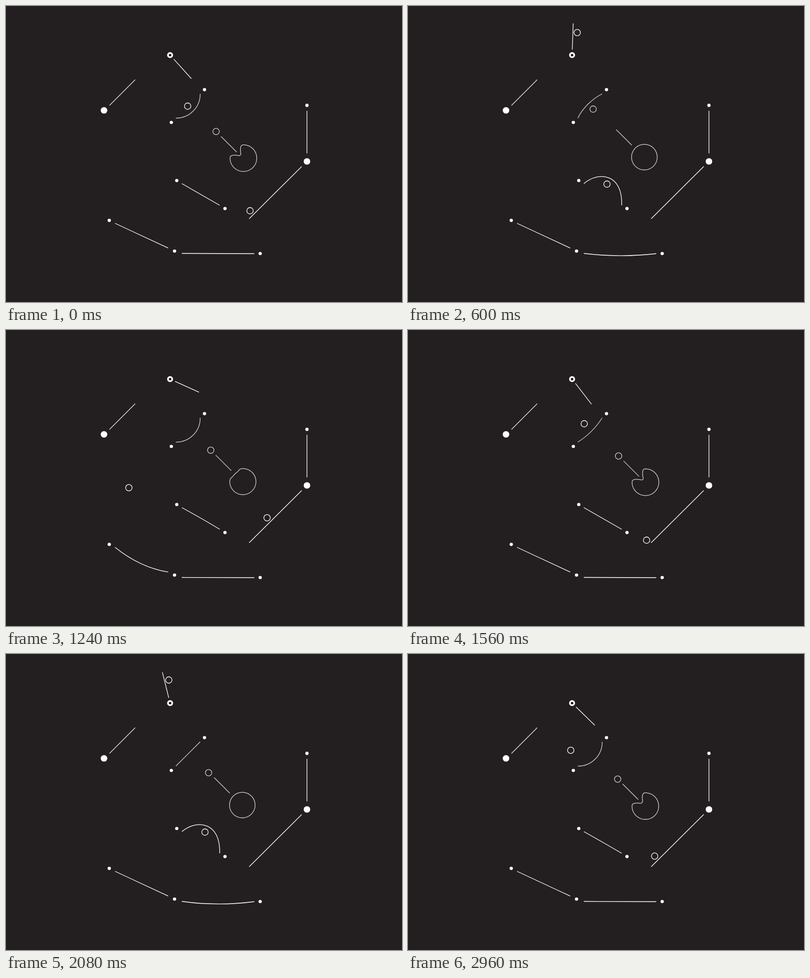
Recreate the animation shown at these times as an HTML page with a canvas. Size 800 by 600 pixels, loop 3 s.

```html
<!DOCTYPE html>
<html lang="en">
<head>
<meta charset="utf-8">
<title>Line machine</title>
<style>
  html, body { margin: 0; width: 100%; height: 100%; overflow: hidden; background: #231f20; }
  canvas { display: block; width: 800px; height: 600px; }
</style>
</head>
<body>
<canvas id="stage" width="800" height="600"></canvas>
<script>
const ctx = document.getElementById('stage').getContext('2d');
const WHITE = '#fff', GREY = '#d3d1d1', BACK = '#231f20';
const BEAT = 1500, STEP = 40;
const PIVOT = [331.5, 99.5];
const CATCH = 1200, FIRE = 560, FREE = 580, PUSH = 16.3;

const mix = (a, b, u) => a + (b - a) * u;
const span = (a, b, t) => Math.max(0, Math.min(1, (t - a) / (b - a)));
const easeOut = (u, n = 3) => 1 - (1 - u) ** n;
const ringing = (s, speed) => Math.exp(-s / 170) * Math.cos(s * speed);

// Bounce points: [time, x, y, pull]; pull 1 falls from rest, -1 slows to rest.
const course = [
  [0, 367, 203, 0], [60, 356, 190, .5], [440, 285, 104, -1], [600, 342, 54, 0],
  [820, 572, 336, .6], [920, 558.3, 345.5, 0], [1160, 538, 370, .95], [1500, 493, 415, 0],
  [1560, 482, 426, 0], [1650, 462, 489, .4], [1735, 443, 527, -1], [1800, 428, 489, 1],
  [1930, 399, 400, 0], [2060, 402, 361, -1], [2120, 402, 361, 0], [2320, 274, 452, .6],
  [2420, 266, 483, -.8], [2500, 264, 486, -1], [2620, 258, 448, 1], [2865, 238, 186, 0],
  [3000, 367, 203, .8]
];
const shuttle = [
  [FIRE, 426.8, 256.8, 0], [FREE, 409.3, 240.6, 0], [600, 374, 209, 0],
  [700, 348.4, 186, -.9], [990, 348, 185.3, 0], [CATCH, 410.5, 240.5, 0]
];

function follow(path, t) {
  const i = Math.max(1, path.findIndex(key => key[0] >= t));
  const [t0, x0, y0] = path[i - 1], [t1, x1, y1, pull] = path[i];
  const u = span(t0, t1, t);
  return [mix(x0, x1, u), mix(y0, y1, u + pull * (u * u - u))];
}

// A band stretches while a ball sinks in, then rings out.
const pluck = (hit, release, speed) => p =>
  p < release ? easeOut(span(hit, release, p)) : ringing(p - release, speed);

// The sling flips over after the first throw and stays cocked for the next ball.
function sling(p) {
  if (p < 20) return 1;
  if (p < FREE) return ringing(p - 20, .031);
  if (p < 990) return -easeOut(span(FREE, 990, p));
  return mix(-1, 1, easeOut(span(990, 1080, p)));
}

// End points, the two control points at full stretch, and the stretch over a beat.
const bands = [
  { color: GREY, a: [392.3, 178], b: [343, 227.3],
    full: [392.6, 205.5, 370.5, 227.6], back: [345, 153, 311, 184], bend: sling },
  { color: WHITE, a: [355.3, 360], b: [431.7, 404],
    full: [386, 334, 434, 340], bend: pluck(430, 620, .0218) },
  { color: WHITE, a: [355.3, 501.5], b: [501.5, 502],
    full: [404, 552.5, 453, 552.5], bend: pluck(150, 235, .0177) },
  { color: WHITE, a: [220.3, 440.5], b: [327.7, 490.7],
    full: [223, 489, 266, 522], bend: pluck(820, 1000, .0239) }
];

const smallDots = [[401, 169.6], [334, 236], [345, 353.8], [442.4, 410.6], [208.6, 434.6],
  [340.5, 496.7], [513.5, 501.7], [608, 201.4]];

// Steady drift, plus a swing that speeds up to the throw and dies away after it.
function paddleAngle(p) {
  const t = p < 60 ? p + BEAT : p;
  const swing = t < 600
    ? 171 * ((t - 60) / 540) ** 2.3 - 171
    : 55 * (1 - Math.exp((600 - t) / 75));
  return (272 + .09 * (t - 600) + swing) * Math.PI / 180;
}

function plungerPush(p) {
  if (p >= FIRE && p < CATCH) return PUSH * (1 - span(FIRE, FREE, p));
  const t = p < FIRE ? p + BEAT : p;
  return PUSH * easeOut(span(CATCH, FIRE + BEAT, t), 4.5);
}

function stroke(color, width = 1.3) {
  ctx.strokeStyle = color;
  ctx.lineWidth = width;
  ctx.stroke();
}

function line(x1, y1, x2, y2, color = WHITE) {
  ctx.beginPath();
  ctx.moveTo(x1, y1);
  ctx.lineTo(x2, y2);
  stroke(color);
}

function circle(x, y, r) {
  ctx.beginPath();
  ctx.arc(x, y, r, 0, 2 * Math.PI);
}

function dot(x, y, r) {
  circle(x, y, r);
  ctx.fillStyle = WHITE;
  ctx.fill();
}

function ball([x, y], color = WHITE) {
  circle(x, y, 6.5);
  stroke(color);
}

function drawBand({ color, a, b, full, back, bend }, p) {
  const k = bend(p);
  const flipped = k < 0 && back;
  const c = (flipped ? back : full).map((v, i) => {
    const flat = mix(a[i % 2], b[i % 2], i < 2 ? 1 / 3 : 2 / 3);
    return mix(flat, v, flipped ? -k : k);
  });
  ctx.beginPath();
  ctx.moveTo(...a);
  ctx.bezierCurveTo(...c, ...b);
  stroke(color);
}

// A soft ring, dented from the upper left by the plunger.
function drawRing(squeeze) {
  const shift = .1 * squeeze, radius = 26.25 + .054 * squeeze;
  const dent = 1.3 * Math.max(0, squeeze);
  ctx.beginPath();
  for (let deg = -180; deg < 180; deg += 2) {
    const turn = deg * Math.PI / 180, angle = turn - .75 * Math.PI;
    const r = radius - dent * Math.exp(-((turn / .49) ** 4));
    ctx.lineTo(478.2 + shift + r * Math.cos(angle), 307 + shift + r * Math.sin(angle));
  }
  ctx.closePath();
  stroke(GREY);
}

function onPaddle(angle, along, side) {
  const c = Math.cos(angle), s = Math.sin(angle);
  return [PIVOT[0] + along * c - side * s, PIVOT[1] + along * s + side * c];
}

function runner(t, angle) {
  return t > 440 && t <= 600 ? onPaddle(angle, 46, 8.8) : follow(course, t);
}

function draw(t) {
  const p = t % BEAT;
  ctx.fillStyle = BACK;
  ctx.fillRect(0, 0, 800, 600);

  line(209, 201.6, 261, 149.4);
  line(608, 212.6, 608, 298.8);
  line(597.5, 325.2, 491.2, 431.2);
  dot(198, 211.5, 6.6);
  dot(608, 315, 6.6);
  smallDots.forEach(([x, y]) => dot(x, y, 3.3));
  circle(...PIVOT, 4.3);
  stroke(WHITE, 3.4);

  bands.forEach(band => drawBand(band, p));

  const angle = paddleAngle(p);
  line(...onPaddle(angle, 11, 0), ...onPaddle(angle, 64.2, 0));

  const push = plungerPush(p);
  const loose = p >= FREE && p < CATCH;
  line(420.5 + push, 250.5 + push, 452 + push, 282 + push, GREY);
  drawRing(loose ? -8 * Math.exp((FREE - p) / 100) : push);

  ball(loose ? follow(shuttle, p) : [410.5 + push, 240.5 + push], GREY);
  ball(runner(p, angle));
  ball(runner(p + BEAT, angle));
}

const start = performance.now();
function tick() {
  // A small lead keeps timer jitter from holding back a step.
  const step = Math.floor((performance.now() - start + 6) / STEP);
  draw(step * STEP % (2 * BEAT));
  requestAnimationFrame(tick);
}
tick();
</script>
</body>
</html>
```
